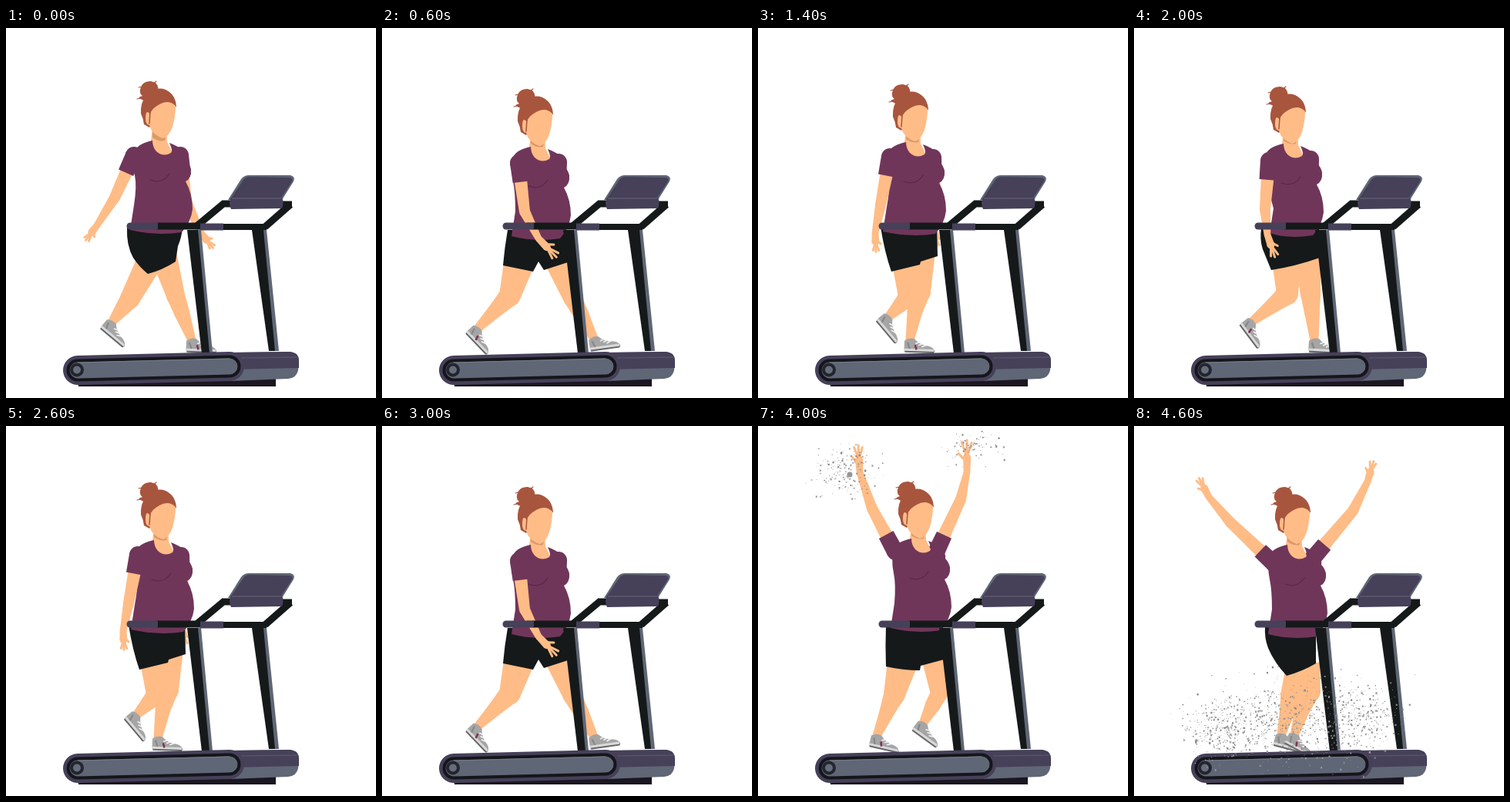
An HTML page with a canvas for the animation above (4.8 s loop, 480 by 480 pixels).

```html
<!DOCTYPE html>
<html lang="en">
<head>
<meta charset="utf-8">
<title>Treadmill walk</title>
<style>
html, body { margin: 0; width: 100%; height: 100%; overflow: hidden; background: #fff; }
canvas { display: block; width: 100vw; height: 100vh; }
</style>
</head>
<body>
<canvas id="stage" width="480" height="480"></canvas>
<script>
const ctx = document.getElementById('stage').getContext('2d');
const STEP = 200, STEPS = 24, RAISE = 18;
const SKIN = '#ffbc86', SHADE = '#d99a6c', SHIRT = '#70365a', FOLD = '#59274a';
const HAIR = '#a8553e', BLACK = '#15191a', PLUM = '#464059', STEEL = '#5f6675';

// leg: hip x,y,r, knee x,y,r, ankle x,y, foot angle
const gait = [
  { near: [202, 286, 18, 220, 347, 12, 241, 405, 2], far: [192, 292, 18, 161, 351, 13, 137, 382, 40],
    shorts: 'M157 258L229 258Q228 272 223 283L220 303Q203 314 184 319Q172 309 165 298Q156 282 157 258Z' },
  { near: [210, 290, 20, 208, 342, 16, 197, 405, 2], far: [192, 305, 18, 196, 348, 14, 169, 375, 50],
    shorts: 'M159 258L232 258L233 296L211 303L210 307L173 316Q164 290 159 258Z' },
  { near: [188, 305, 20, 177, 348, 14, 154, 402, 13], far: [227, 300, 15, 235, 347, 11, 214, 386, 36],
    shorts: 'M166 258L240 258L241 303L211 311L210 317Q188 317 166 312Q165 285 166 258Z' },
  { near: [178, 304, 20, 166, 347, 14, 124, 390, 46], far: [227, 300, 17, 247, 350, 12, 275, 403, -8],
    shorts: 'M163 262L240 262L244 303L210 314L203 303L196 316L157 308Q159 285 163 262Z' },
  { near: [198, 302, 19, 199, 345, 14, 153, 381, 53], far: [225, 295, 17, 229, 345, 13, 234, 405, 3],
    shorts: 'M165 260L240 260L241 298Q210 309 178 314L167 287Q163 275 165 260Z' },
  { near: [223, 308, 18, 226, 344, 16, 208, 401, 28], far: [214, 312, 17, 204, 350, 14, 191, 401, 15],
    shorts: 'M170 260L236 260L236 308Q219 318 198 324Q182 307 174 288Q169 275 170 260Z' }
];

// body: torso dx,dy, head dx,dy, left waist x; arm: shoulder, elbow, wrist, fingertip
const walk = [
  { body: [0, 0, 0, 0, 161], near: [166, 165, 141, 220, 118, 256, 103, 276], far: [226, 165, 234, 225, 253, 266, 269, 286] },
  { body: [2, 2, 0, 4, 162], near: [171, 167, 159, 230, 152, 266, 153, 291], far: [227, 168, 230, 225, 229, 262, 232, 284] },
  { body: [4, 5, 1, 7, 166], near: [174, 172, 171, 238, 178, 268, 192, 296], far: [229, 171, 228, 225, 225, 255, 222, 272] },
  { body: [3, 8, 1, 10, 168], near: [177, 175, 185, 238, 203, 273, 227, 298], far: [229, 174, 228, 225, 222, 255, 215, 270] },
  { body: [4, 4, 2, 7, 176], near: [175, 172, 170, 235, 173, 268, 183, 298], far: [229, 170, 229, 225, 226, 255, 222, 272] },
  { body: [3, 3, 1, 7, 168], near: [171, 169, 156, 228, 143, 262, 134, 285], far: [228, 168, 232, 225, 240, 262, 248, 284] }
];
const cheer = [
  { body: [4, -2, 4, -5, 168], near: [173, 163, 142, 189, 129, 148, 124, 118], far: [230, 163, 258, 188, 272, 146, 276, 116] },
  { body: [7, -1, 6, 0, 171], near: [177, 161, 149, 105, 134, 58, 126, 17], far: [230, 163, 261, 96, 269, 62, 270, 16] },
  { body: [9, 0, 7, 3, 172], near: [178, 163, 148, 107, 132, 60, 130, 24], far: [231, 164, 263, 95, 271, 60, 271, 17] },
  { body: [9, 5, 8, 8, 173], near: [180, 172, 137, 113, 113, 74, 101, 45], far: [231, 168, 273, 102, 285, 66, 291, 37] },
  { body: [9, 5, 8, 7, 173], near: [181, 176, 126, 119, 92, 84, 73, 61], far: [231, 170, 284, 106, 304, 68, 312, 39] },
  { body: [9, 8, 8, 10, 174], near: [182, 179, 125, 125, 97, 92, 84, 67], far: [231, 173, 284, 110, 303, 72, 311, 45] }
];

function fill(path, color) {
  ctx.fillStyle = color;
  ctx.fill(new Path2D(path));
}

function line(color, width, cap, ...p) {
  ctx.strokeStyle = color;
  ctx.lineWidth = width;
  ctx.lineCap = cap;
  ctx.beginPath();
  for (let i = 0; i < p.length; i += 2) ctx.lineTo(p[i], p[i + 1]);
  ctx.stroke();
}

function disc(x, y, r, color) {
  ctx.fillStyle = color;
  ctx.beginPath();
  ctx.arc(x, y, r, 0, Math.PI * 2);
  ctx.fill();
}

function taper(x1, y1, r1, x2, y2, r2, color) {
  const len = Math.hypot(x2 - x1, y2 - y1) || 1;
  const nx = (y1 - y2) / len, ny = (x2 - x1) / len;
  ctx.fillStyle = color;
  ctx.beginPath();
  ctx.moveTo(x1 + nx * r1, y1 + ny * r1);
  ctx.lineTo(x2 + nx * r2, y2 + ny * r2);
  ctx.lineTo(x2 - nx * r2, y2 - ny * r2);
  ctx.lineTo(x1 - nx * r1, y1 - ny * r1);
  ctx.fill();
}

function moved(dx, dy, draw) {
  ctx.save();
  ctx.translate(dx, dy);
  draw();
  ctx.restore();
}

function shoe(x, y, angle, striped) {
  moved(x, y, () => {
    ctx.rotate(angle * Math.PI / 180);
    fill('M-7 11L31 11Q34 14 31 16L-6 16Z', '#66676a');
    fill('M-7 12L-7 1Q-1 -4 6 -2Q13 6 25 7Q32 9 32 13Z', '#a5a5a5');
    fill('M-7 11L31 11L32 14L-7 14Z', '#d9d9d9');
    line('#f4f4f4', 1.6, 'round', 8, 4, 13, 2);
    line('#f4f4f4', 1.6, 'round', 12, 6, 17, 4);
    line('#f4f4f4', 1.6, 'round', 16, 8, 21, 6);
    line('#858585', 2, 'butt', -3, 3, 0, 11);
    if (striped) line('#7b3350', 2.5, 'butt', 7, 6, 9, 12);
  });
}

function leg([hx, hy, hr, kx, ky, kr, ax, ay, angle], striped) {
  // calf point keeps the lower leg rounded
  const cx = kx + (ax - kx) * 0.4, cy = ky + (ay - ky) * 0.4;
  taper(hx, hy, hr, kx, ky, kr, SKIN);
  disc(kx, ky, kr, SKIN);
  taper(kx, ky, kr, cx, cy, 10, SKIN);
  disc(cx, cy, 10, SKIN);
  taper(cx, cy, 10, ax, ay, 5.5, SKIN);
  disc(ax, ay, 5.5, SKIN);
  shoe(ax, ay, angle, striped);
}

function hand(wx, wy, tx, ty) {
  const a = Math.atan2(ty - wy, tx - wx), len = Math.hypot(tx - wx, ty - wy);
  const at = (r, turn) => [wx + Math.cos(a + turn) * r, wy + Math.sin(a + turn) * r];
  const palm = at(len * 0.45, 0);
  taper(wx, wy, 4.3, ...palm, 5, SKIN);
  disc(...palm, 5, SKIN);
  for (const [turn, reach] of [[-0.17, 0.92], [0, 0.97], [0.16, 0.9]])
    line(SKIN, 3, 'round', ...palm, ...at(len * reach, turn));
  line(SKIN, 3, 'round', ...at(len * 0.3, 0), ...at(len * 0.62, -0.42));
}

function arm([sx, sy, ex, ey, wx, wy, tx, ty]) {
  const k = 25 / Math.hypot(ex - sx, ey - sy);
  taper(sx, sy, 9, ex, ey, 7, SKIN);
  disc(ex, ey, 7, SKIN);
  taper(ex, ey, 7, wx, wy, 4.3, SKIN);
  disc(wx, wy, 4.3, SKIN);
  hand(wx, wy, tx, ty);
  disc(sx, sy, 11, SHIRT);
  taper(sx, sy, 11, sx + (ex - sx) * k, sy + (ey - sy) * k, 10.5, SHIRT);
}

function torso(waist) {
  fill(`M190 146Q172 150 168 158Q163 172 167 191Q170 205 ${waist + 5} 230L${waist} 262
    Q195 270 228 265Q240 252 242 235Q242 215 233 199Q241 195 240 183Q238 176 234 172
    Q236 158 212 149Q217 160 214 162Q204 168 195 160Q190 154 190 146Z`, SHIRT);
  ctx.strokeStyle = FOLD;
  ctx.lineWidth = 1.3;
  ctx.stroke(new Path2D('M187 197Q203 203 212 189'));
}

function neck() {
  fill('M190 128L208 128L209 148L216 162Q204 169 193 161L188 147Z', SKIN);
  fill('M190 134L207 141L206 146Q198 148 190 142Z', SHADE);
}

function head() {
  fill('M174 80Q176 69 188 69L194 71Q199 76 197 85L186 95Q177 95 172 90L177 88Q173 85 174 80Z', HAIR);
  line(HAIR, 1.2, 'round', 176, 91, 170, 92);
  line(HAIR, 1.2, 'round', 191, 72, 195, 69);
  line(HAIR, 1.2, 'round', 177, 76, 172, 77);
  fill('M221 102Q220 86 207 80Q194 75 182 87Q174 97 175 111Q178 117 179 125L186 129L206 105Z', HAIR);
  fill('M220 101Q211 92 199 99Q188 105 187 112Q181 104 181 118Q181 125 186 126Q189 138 203 143Q211 142 216 128Q220 114 220 101Z', SKIN);
  line(HAIR, 1.5, 'round', 187, 109, 186, 124);
}

function treadmill() {
  fill('M92 452L350 452L350 465L94 465Z', '#1b1621');
  fill('M292 421L368 420Q380 421 380 432L379 444Q377 454 366 455L292 458Z', STEEL);
  fill('M292 421L368 420Q380 421 380 432L380 441L292 443Z', PLUM);
  line('#57516a', 1.5, 'butt', 302, 428, 378, 427);

  fill('M319 262L335 262L350 419L341 419Z', BLACK);
  fill('M334 262L338 262L354 419L349 419Z', STEEL);
  fill('M235 262L250 262L265 422L254 422Z', BLACK);
  fill('M249 262L253 262L268 422L264 422Z', STEEL);

  const deck = [93, 444, 290, 439];
  line(PLUM, 38, 'round', ...deck);
  line('#15161b', 29, 'round', ...deck);
  line(STEEL, 21, 'round', ...deck);
  line('#777e8b', 1, 'butt', 93, 434, 290, 429);
  disc(92, 443.5, 9, '#24252d');
  disc(92, 443.5, 5, '#666d7c');

  line(BLACK, 9, 'butt', 195, 257, 254, 257);
  line(BLACK, 8, 'butt', 280, 258, 338, 258);
  line(BLACK, 9, 'butt', 246, 258, 282, 228, 294, 228);
  line(BLACK, 9, 'butt', 357, 229, 371, 229);
  line(BLACK, 9, 'butt', 369, 229, 336, 258);
  line(PLUM, 9, 'round', 161, 257, 192, 257);
  line(PLUM, 9, 'butt', 188, 257, 197, 257);
  line(PLUM, 9, 'butt', 252, 258, 282, 258);

  fill('M288 223L305 196Q309 191 315 191L369 191Q376 193 373 199L358 223Z', STEEL);
  fill('M291 222L308 197Q311 193 316 193L368 194Q373 195 371 199L356 222Z', PLUM);
  fill('M292 220L358 220Q361 227 358 234L292 235Q288 228 292 220Z', PLUM);
  line('#6a6679', 1, 'butt', 293, 221, 357, 221);
}

function randomizer(seed) {
  return () => (seed = (seed * 16807) % 2147483647) / 2147483647;
}

function dust(count, cx, cy, rx, ry, seed) {
  const rnd = randomizer(seed);
  const spread = () => (rnd() + rnd() + rnd()) / 1.5 - 1;
  for (let i = 0; i < count; i++) {
    const x = cx + spread() * rx, y = cy + spread() * ry;
    const size = 0.7 + 1.6 * rnd() ** 2;
    ctx.fillStyle = rnd() < 0.5 ? '#858585' : '#a0a0a0';
    ctx.fillRect(x, y, size, size * (0.6 + rnd() * 0.7));
  }
}

function draw(step) {
  const raised = step >= RAISE;
  const legs = gait[step % 6];
  const pose = raised ? cheer[step - RAISE] : walk[step % 6];
  const [dx, dy, hx, hy, waist] = pose.body;

  ctx.fillStyle = '#fff';
  ctx.fillRect(0, 0, 480, 480);
  arm(pose.far);
  leg(legs.far, false);
  leg(legs.near, true);
  fill(legs.shorts, BLACK);
  moved(dx, dy, () => {
    neck();
    torso(waist - dx);
  });
  arm(pose.near);
  moved(hx, hy, head);
  treadmill();

  if (step === 20) {
    dust(190, 114, 56, 58, 46, 4211);
    dust(95, 280, 28, 52, 38, 9173);
    disc(119, 63, 3.5, '#969696');
  }
  if (step === 23) {
    dust(850, 205, 382, 172, 80, 7717);
    dust(260, 110, 395, 66, 55, 3301);
    dust(180, 300, 375, 68, 55, 5519);
  }
}

let shown = -1;
const start = performance.now();
function tick(now) {
  const step = Math.floor(Math.max(0, now - start) / STEP) % STEPS;
  if (step !== shown) draw(shown = step);
  requestAnimationFrame(tick);
}
draw(shown = 0);
requestAnimationFrame(tick);
</script>
</body>
</html>
```
